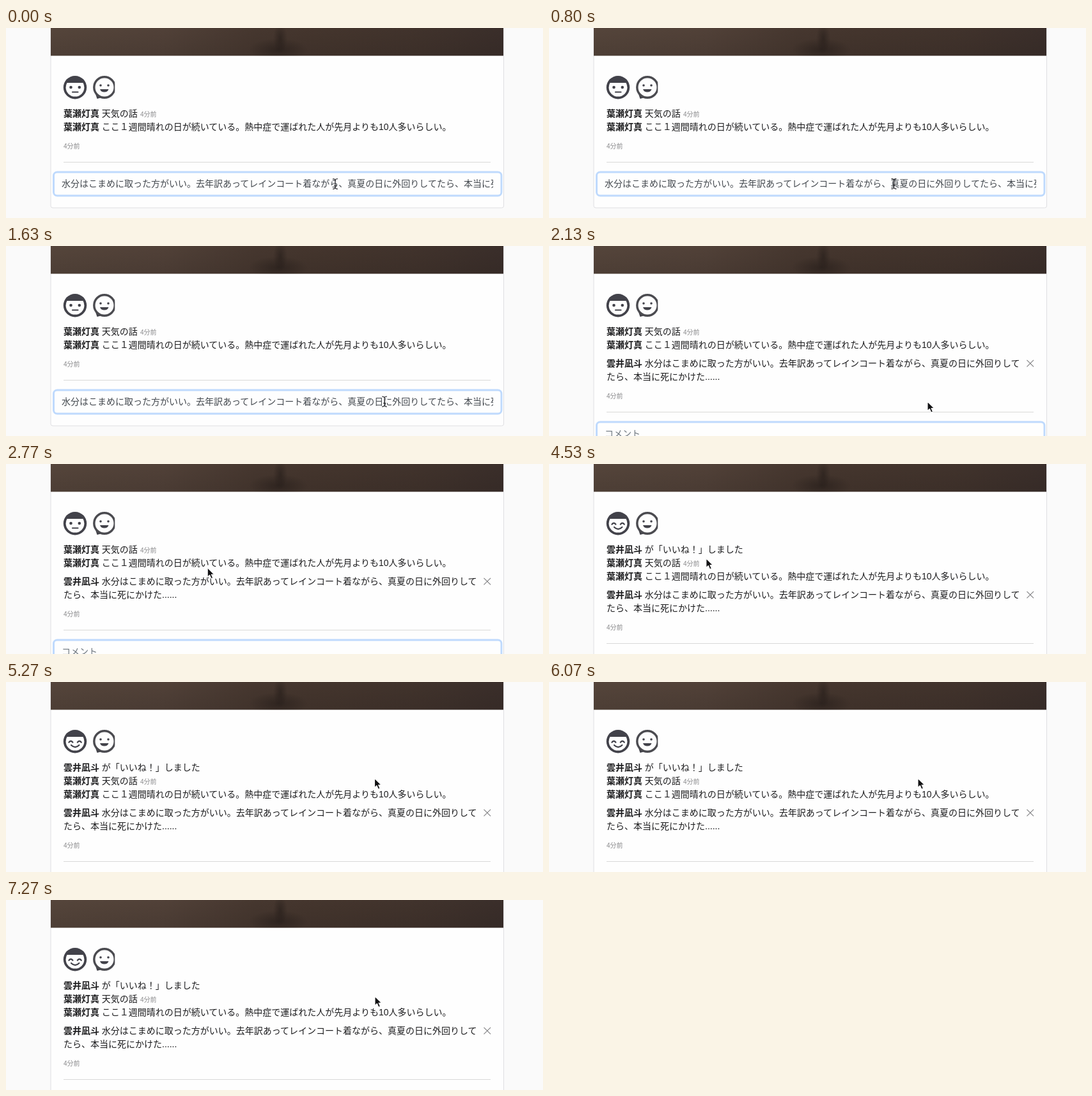
An HTML page that plays this animation: 840 px wide and 298 px high, repeating every 7.31 s.

```html
<!DOCTYPE html>
<html lang="ja">
<head>
<meta charset="utf-8">
<title>コメントといいね</title>
<style>
  html, body { margin: 0; width: 100%; height: 100%; overflow: hidden; background: #fafafa; }
  svg { display: block; width: 840px; height: 298px; }
  text { font: 14px "Liberation Sans", "Noto Sans CJK JP", "Noto Sans CJK", sans-serif; fill: #1c1c1e; white-space: pre; }
  .name { font-weight: 700; }
  .time { font-size: 10px; fill: #8a8a8c; }
  .typed { fill: #43484e; }
  .hint { fill: #6c757d; }
  .rule { stroke: #d9d9d8; }
  .line { fill: none; stroke: #42424a; stroke-width: 2.2; stroke-linecap: round; }
  .ink { fill: #42424a; }
  .paper { fill: #fefefe; }
</style>
</head>
<body>
<svg viewBox="0 0 840 298">
  <defs>
    <linearGradient id="ground">
      <stop offset="0" stop-color="#55453b"/>
      <stop offset=".25" stop-color="#514138"/>
      <stop offset=".45" stop-color="#46372f"/>
      <stop offset=".6" stop-color="#44352d"/>
      <stop offset=".8" stop-color="#41332c"/>
      <stop offset="1" stop-color="#3a2e2a"/>
    </linearGradient>
    <linearGradient id="shade" x2="0" y2="1">
      <stop offset="0" stop-color="#1c1614" stop-opacity="0"/>
      <stop offset="1" stop-color="#1c1614" stop-opacity=".15"/>
    </linearGradient>
    <radialGradient id="patch">
      <stop offset="0" stop-color="#1a1412" stop-opacity=".45"/>
      <stop offset="1" stop-color="#1a1412" stop-opacity="0"/>
    </radialGradient>
    <clipPath id="photoBox"><rect x="70" width="708" height="43.5"/></clipPath>
    <clipPath id="fieldBox"><rect x="80" y="228" width="682" height="34"/></clipPath>
    <clipPath id="bubbleBox"><rect x="134" y="72" width="36.3" height="42"/></clipPath>
    <clipPath id="faceBox"><rect x="90" y="86" width="36" height="25"/></clipPath>
  </defs>

  <rect width="840" height="298" fill="#fafafa"/>
  <rect id="card" x="70" y="-20" width="708.5" height="302" rx="3" fill="#fefefe" stroke="#dfdfe2"/>
  <g clip-path="url(#photoBox)">
    <rect x="70" width="708" height="44" fill="url(#ground)"/>
    <rect x="70" width="708" height="44" fill="url(#shade)"/>
    <ellipse cx="426" cy="34" rx="46" ry="18" fill="url(#patch)"/>
    <ellipse cx="429" cy="16" rx="11" ry="24" fill="url(#patch)"/>
  </g>

  <circle class="ink" cx="108" cy="93.2" r="18.2"/>
  <circle class="paper" cx="108" cy="93.2" r="14.4" clip-path="url(#faceBox)"/>
  <g id="calm">
    <circle class="ink" cx="101.5" cy="93" r="2.3"/>
    <circle class="ink" cx="114.8" cy="93" r="2.3"/>
    <path class="line" d="M104 100.5h8.5"/>
  </g>
  <g id="happy">
    <path class="line" d="M98.4 94.6q3-4 6 0M111.8 94.6q3-4 6 0M102 99q6.2 6.4 12.4 0"/>
  </g>

  <g clip-path="url(#bubbleBox)">
    <path class="ink" d="M139.5 102L142.5 111L150 109Z"/>
    <circle class="paper" cx="154" cy="93" r="16.2" stroke="#4b4b50" stroke-width="3.4"/>
    <circle class="ink" cx="148" cy="90" r="1.8"/>
    <circle class="ink" cx="160" cy="90" r="1.8"/>
    <path class="ink" d="M147 96h13.5q-1.4 4.6-6.7 4.6t-6.8-4.6z"/>
  </g>

  <g id="likeRow"></g>
  <g id="post"></g>
  <g id="reply">
    <path d="M747.5 178.8l10.6 10.6m0-10.6l-10.6 10.6" stroke="#808083" stroke-width="1.1"/>
  </g>
  <g id="footer">
    <text class="time" x="90" y="189">4分前</text>
    <path class="rule" d="M90 210.5H758"/>
    <g id="ring" fill="none">
      <rect x="74.5" y="226" width="700.5" height="37" rx="5.5" stroke="#bfdafd" stroke-width="3"/>
    </g>
    <g clip-path="url(#fieldBox)">
      <text class="typed" id="typed" x="87" y="249"></text>
      <text class="hint" id="hint" x="87" y="249">コメント</text>
    </g>
  </g>

  <g id="cursor" stroke-linejoin="round">
    <path id="beam" fill="none" stroke="#26262a" stroke-width="1.2"
      d="M-4 -8q4 0 4 2.5q0-2.5 4-2.5M0 -6V6M-4 8q4 0 4-2.5q0 2.5 4 2.5M-2 2.5h4"/>
    <path id="arrow" fill="#111113" stroke="#fefefe" stroke-width="1.1"
      d="M0 0V14.6L3.4 11.5L5.8 17.1L8.5 16L6.1 10.6H10.6Z"/>
    <g id="hand" fill="#fefefe" stroke="#1c1c1e" stroke-width="1.2">
      <path d="M-1.6 1.2C-1.6-.8 1.4-.8 1.6 1.2L2.4 6C3.2 4.5 5 4.7 5.4 6.2C6.4 5 8 5.4 8.4 6.9
        C9.6 6 11 6.8 11 8.4V12L9.4 16H1.6L-2 11.5L-4.4 9.4C-5.6 8-3.8 6.6-2.4 7.5L-.8 8.7Z"/>
      <path fill="none" stroke-width=".9" d="M2.8 10v4M5.2 10v4M7.6 10v4"/>
    </g>
  </g>
</svg>
<script>
const LOOP = 7310;
const POSTED = 2000, BLUR = 3560, LIKED = 4000;
const AUTHOR = '葉瀬灯真', VISITOR = '雲井凪斗';
const COMMENT = '水分はこまめに取った方がいい。去年訳あってレインコート着ながら、真夏の日に外回りして';
const REST = 'たら、本当に死にかけた';

const $ = id => document.getElementById(id);
const show = (id, on) => $(id).setAttribute('visibility', on ? 'visible' : 'hidden');
const move = (id, x, y) => $(id).setAttribute('transform', `translate(${x} ${y})`);

function addText(id, x, y, content, cls = '') {
  const el = document.createElementNS('http://www.w3.org/2000/svg', 'text');
  el.setAttribute('x', x);
  el.setAttribute('y', y);
  el.setAttribute('class', cls);
  el.textContent = content;
  $(id).append(el);
}

function addRow(id, y, name, content) {
  addText(id, 90, y, name, 'name');
  addText(id, 149.7, y, content);
}

addRow('likeRow', 139, VISITOR, 'が「いいね！」しました');
addRow('post', 139, AUTHOR, '天気の話');
addText('post', 210, 139, '4分前', 'time');
addRow('post', 160, AUTHOR, 'ここ１週間晴れの日が続いている。熱中症で運ばれた人が先月よりも10人多いらしい。');
addRow('reply', 189, VISITOR, COMMENT);
addText('reply', 90, 210, REST + '......');
$('typed').textContent = COMMENT + REST;

const ease = {
  both: p => p * p * (3 - 2 * p),
  in: p => p * p,
  out: p => p * (2 - p)
};

// time, x, y, easing on the way there
const path = [
  [0, 515, 244.5, 'both'],
  [500, 515, 244.5, 'both'],
  [1300, 592, 244, 'both'],
  [2270, 592, 244, 'both'],
  [2770, 316, 163, 'in'],
  [3300, 102, 90, 'out'],
  [4150, 102, 90, 'both'],
  [4530, 245, 148, 'in'],
  [5300, 577, 151, 'out'],
  [LOOP, 577, 151, 'both']
];

function pointer(t) {
  const i = path.findIndex(k => k[0] > t);
  const [t0, x0, y0] = path[i - 1];
  const [t1, x1, y1, mode] = path[i];
  const p = ease[mode]((t - t0) / (t1 - t0));
  return [x0 + (x1 - x0) * p, y0 + (y1 - y0) * p];
}

function render(t) {
  const posted = t >= POSTED, liked = t >= LIKED;
  const push = liked ? 21 : 0;
  const drop = push + (posted ? 50 : 0);

  show('calm', !liked);
  show('happy', liked);
  show('likeRow', liked);
  show('reply', posted);
  show('typed', !posted);
  show('hint', posted);
  move('post', 0, push);
  move('reply', 0, push);
  move('footer', 0, drop);
  $('card').setAttribute('height', 302 + drop);
  $('ring').setAttribute('opacity', 1 - Math.min(1, Math.max(0, (t - BLUR) / 150)));

  const [x, y] = pointer(t);
  const overFace = Math.hypot(x - 108, y - 93) < 18;
  move('cursor', x, y);
  show('beam', !posted);
  show('arrow', posted && !overFace);
  show('hand', overFace);
}

const start = performance.now();
function tick() {
  render((performance.now() - start) % LOOP);
  requestAnimationFrame(tick);
}
tick();
</script>
</body>
</html>
```
